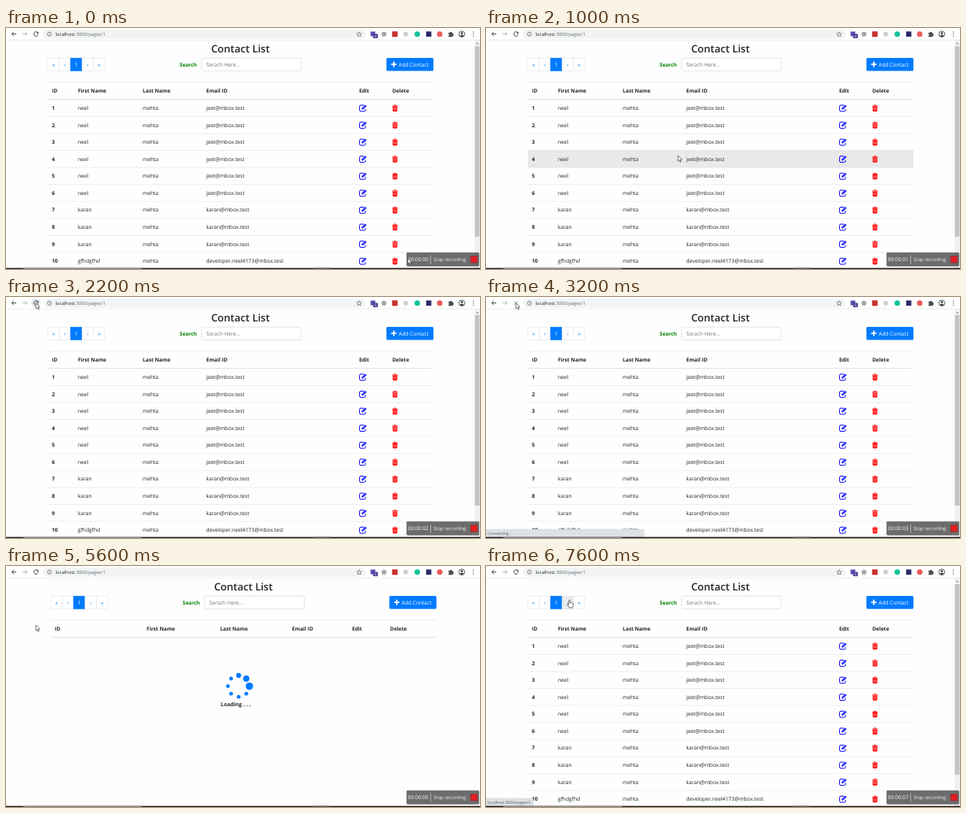
These frames come from a looping animation (600x306 px, 8 s). An HTML page:

```html
<!DOCTYPE html>
<html lang="en">
<head>
<meta charset="utf-8">
<title>Contact List</title>
<style>
  html, body { margin: 0; width: 100%; height: 100%; overflow: hidden; background: #fff; }
  svg { display: block; width: 100vw; height: 100vh; }
  text { font-family: "Open Sans", "Noto Sans", sans-serif; font-size: 6.63px; fill: #212529; text-rendering: geometricPrecision; white-space: pre; }
  .b { font-weight: 700; }
  .mid { text-anchor: middle; }
  .line { fill: none; stroke: #dee2e6; stroke-width: .6; }
  .ico { fill: none; stroke: #4a4d51; stroke-width: 1; }
</style>
</head>
<body>
<svg id="stage" viewBox="0 0 600 306" preserveAspectRatio="none">
  <defs>
    <g id="edit" fill="none" stroke="#00f" stroke-width="1">
      <path d="M6 1H2Q.6 1 .6 2.4V7.4Q.6 8.8 2 8.8H6.6Q8 8.8 8 7.4V5.8"/>
      <path d="M3.3 6.4V4.7L7.6.4L9.4 2.1L5 6.4Z" fill="#00f" stroke="none"/>
      <path d="M4.2 5.3L7.7 1.9" stroke="#fff" stroke-width=".5"/>
    </g>
    <g id="trash">
      <path d="M.7 2.6H6.5V7.6Q6.5 8.8 5.4 8.8H1.8Q.7 8.8 .7 7.6Z" fill="#f00"/>
      <path d="M0 1.9H7.2M2.3 1.7L2.8.6H4.4L4.9 1.7" fill="none" stroke="#f00" stroke-width=".9"/>
      <path d="M2.2 3.7V7.4M3.6 3.7V7.4M5 3.7V7.4" stroke="#fff" stroke-width=".45"/>
    </g>
  </defs>

  <rect width="600" height="306" fill="#fefefe"/>
  <g id="list"></g>
  <g id="load" transform="translate(3.75)"></g>

  <g id="toolbar">
    <rect width="600" height="15" fill="#fff"/>
    <path d="M0 15.2H600" class="line"/>
    <path class="ico" d="M13 7.6H7.4M10 4.9L7.3 7.6L10 10.3"/>
    <path class="ico" d="M21 7.6H26.6M24 4.9L26.7 7.6L24 10.3" style="stroke:#b9bbbe"/>
    <circle id="halo" cx="38" cy="7.8" r="6" fill="#e6e8ea"/>
    <g id="reload">
      <path class="ico" d="M40.2 5.8A2.8 2.8 0 1 0 40.7 8.4"/>
      <path d="M41.1 4.4V7.3H38.2Z" fill="#4a4d51"/>
    </g>
    <path id="stop" class="ico" d="M35.7 5.4L40.3 10M40.3 5.4L35.7 10" style="stroke:#9a9da1"/>
    <rect x="47" y="2" width="408" height="11.6" rx="5.8" fill="#f1f3f4"/>
    <circle class="ico" cx="55" cy="7.8" r="2.6" style="stroke-width:.6"/>
    <path class="ico" d="M55 6.2V6.8M55 7.3V9.3" style="stroke-width:.6"/>
    <text x="62.6" y="9.9" style="font-size:5.85px">localhost<tspan fill="#666b70">:3000/pages/1</tspan></text>
    <path class="ico" style="stroke-width:.6" d="M447 4.8L447.9 6.9L450.1 7.1L448.4 8.5L449 10.7L447 9.5L445 10.7L445.6 8.5L443.9 7.1L446.1 6.9Z"/>
    <rect x="461.5" y="4.5" width="6" height="6" fill="#5b4bb0"/>
    <rect x="464.7" y="7.4" width="6" height="5.6" rx="1" fill="#3d3a8c"/>
    <text class="mid" x="467.7" y="12" style="font-size:4.8px;fill:#fff">6</text>
    <circle cx="478.5" cy="7.8" r="3.1" fill="#a3a6a8"/>
    <rect x="488.7" y="4.3" width="7" height="7" fill="#c9302c"/>
    <circle cx="506" cy="7.8" r="3" fill="#cfcfcf"/>
    <circle cx="520.6" cy="7.7" r="3.5" fill="#15c39a"/>
    <rect x="531.8" y="4.4" width="6.6" height="6.6" fill="#2b2868"/>
    <circle cx="549" cy="7.7" r="3.5" fill="#ee5a5a"/>
    <path fill="#4a4d51" d="M560 6H561.8A1.2 1.2 0 0 1 564.2 6H565.6V7.5A1.2 1.2 0 0 1 565.6 9.9V11.3H560V9.7A1 1 0 0 0 560 7.7Z"/>
    <circle cx="577" cy="7.7" r="3.8" fill="none" stroke="#33363a" stroke-width=".8"/>
    <circle cx="577" cy="6.6" r="1.4" fill="#33363a"/>
    <path d="M574.3 9.9Q577 7.4 579.7 9.9Q577 12.2 574.3 9.9Z" fill="#33363a"/>
    <path d="M591.7 5V5.01M591.7 7.7V7.71M591.7 10.4V10.41" stroke="#4a4d51" stroke-width="1.3" stroke-linecap="round"/>
  </g>

  <g id="status">
    <rect id="bubble" x="-3" y="295" height="13" rx="2" fill="#dee1e6" stroke="#c8cbd0" stroke-width=".4"/>
    <text id="note" x="2" y="302" style="font-size:5.05px;fill:#55585c"></text>
  </g>

  <rect y="304.7" width="600" height="1.3" fill="#161616"/>
  <rect x="22" y="304.7" width="150" height="1.3" fill="#8d8d8d"/>
  <rect x="389" y="304.7" width="21" height="1.3" fill="#555"/>

  <g id="recorder">
    <rect x="507.3" y="285.3" width="91.4" height="17" rx="1" fill="#6c6c6c" stroke="#5a5a5a" stroke-width=".6"/>
    <text id="clock" x="508.8" y="296.4" style="fill:#fff;font-size:6.56px"></text>
    <path d="M537.6 288.5V299.5" stroke="#d5d5d5" stroke-width=".7"/>
    <text x="541" y="296.3" style="fill:#f2f2f2;font-size:6.05px">Stop recording</text>
    <rect x="588.3" y="289.8" width="8.2" height="8.2" fill="#e81c24" stroke="#8f2a2d" stroke-width=".8"/>
  </g>

  <g id="cursor" stroke-linejoin="round">
    <path id="arrow" d="M0 0V7.2L1.7 5.7L2.8 8.2L4 7.7L2.9 5.2H5.1Z" fill="#fff" stroke="#222" stroke-width=".6"/>
    <path id="beam" d="M-1.6 -3.8H-.3L0 -3.5L.3 -3.8H1.6M0 -3.5V3.5M-1.6 3.8H-.3L0 3.5L.3 3.8H1.6" fill="none" stroke="#222" stroke-width=".7"/>
    <path id="hand" d="M-.8 .6Q0 -.6 .8 .6V3.6Q1.6 3 2.2 3.9Q3 3.4 3.5 4.2Q4.6 3.9 4.7 5V7.2Q4.7 8.6 3.8 9.9H-.1L-2.6 6.5Q-2.9 5.2 -1.6 5.6L-.8 6.3Z" fill="#fff" stroke="#222" stroke-width=".65"/>
  </g>
</svg>
<script>
const $ = id => document.getElementById(id);
const show = (id, on) => { $(id).style.display = on ? '' : 'none'; };
const text = (x, y, s, cls = '', style = '') =>
  `<text x="${x}" y="${y}" class="${cls}" style="${style}">${s}</text>`;
const line = (y, w = .6) => `<path class="line" d="M53 ${y}H541" style="stroke-width:${w}"/>`;

const TOP = 90.8, ROW = 21.58;
const listCols = [58, 91, 173, 253.5, 447, 489];
const loadCols = [58, 174.3, 267.3, 358.3, 434.3, 482.3];
const heads = ['ID', 'First Name', 'Last Name', 'Email ID', 'Edit', 'Delete'];

function pager(id) {
  const cells = ['«', '‹', '1', '›', '»'].map((s, i) => {
    const x = 53 + i * 14.4, on = i === 2;
    return `<rect ${i === 3 ? `id="${id}Next"` : ''} x="${x}" y="38.2" width="14.4" height="16.2" rx="${i % 4 ? 0 : 1.5}"
      fill="${on ? '#007bff' : '#fff'}" stroke="${on ? '#007bff' : '#dee2e6'}" stroke-width=".6"/>` +
      text(x + 7.2, 48.7, s, 'mid', `fill:${on ? '#fff' : '#007bff'}`);
  });
  return cells.join('');
}

function header(id, cols) {
  return text(296.7, 31.4, 'Contact List', 'mid', 'font-size:13px;font-weight:600') + pager(id) +
    text(219.8, 48.7, 'Search', 'b', 'fill:#008000;font-size:6.5px') +
    '<rect x="247.6" y="38.2" width="126.2" height="16.2" rx="1.7" fill="#fff" stroke="#ced4da" stroke-width=".6"/>' +
    text(253.6, 48.8, 'Serach Here...', '', 'fill:#6c757d') +
    '<rect x="481.5" y="38" width="59.6" height="16.6" rx="1.7" fill="#007bff"/>' +
    '<path d="M487.5 46.2H494.3M490.9 42.8V49.6" stroke="#fff" stroke-width="1.8"/>' +
    text(497, 48.8, 'Add Contact', '', 'fill:#fff') +
    line(68.7) + line(90.6, 1) +
    heads.map((h, i) => text(cols[i], 82.2, h, 'b', 'font-size:6.56px')).join('');
}

function person(i) {
  if (i < 6) return ['neel', 'mehta', 'jeet@mbox.test'];
  if (i < 9) return ['karan', 'mehta', 'karan@mbox.test'];
  return ['gfhdgfhd', 'mehta', 'developer.neel4173@mbox.test'];
}

function rows() {
  let out = `<rect id="hover" x="53" width="488" height="${ROW}" fill="#e9e9e9"/>`;
  for (let i = 0; i < 10; i++) {
    const y = TOP + i * ROW, base = y + 13.2;
    if (i) out += line(y);
    out += text(listCols[0], base, i + 1, 'b');
    person(i).forEach((s, k) => { out += text(listCols[k + 1], base, s); });
    out += `<use href="#edit" x="447" y="${y + 6.2}"/><use href="#trash" x="488.8" y="${y + 6.4}"/>`;
  }
  return out;
}

$('list').innerHTML = rows() + header('list', listCols) +
  '<rect x="593" y="15" width="7" height="291" fill="#f1f1f1"/>' +
  '<rect x="593.6" y="23" width="5.8" height="242" fill="#c4c4c4"/>' +
  '<path d="M595 20.6L596.6 18.6L598.2 20.6Z" fill="#777"/>';
$('load').innerHTML = header('load', loadCols) +
  text(268.1, 178.2, 'Loading . . .', 'b', 'font-size:6.8px') +
  Array.from({ length: 8 }, (_, i) => {
    const a = i * Math.PI / 4;
    return `<circle class="dot" cx="${290.75 + 13.6 * Math.sin(a)}" cy="${152.6 - 13.6 * Math.cos(a)}" fill="#007bff"/>`;
  }).join('');
const dots = document.querySelectorAll('.dot');

// time, x, y, pointer shape
const path = [
  [0, 508.8, 292.3], [200, 430, 256], [400, 322, 202], [600, 269.5, 167, 'beam'],
  [800, 262, 166, 'beam'], [1000, 243, 162], [1200, 84, 6], [1400, 58, 8],
  [1600, 45, 8.5], [1800, 39.5, 8], [2000, 37.8, 7.6], [4400, 37.8, 26],
  [4600, 37.8, 58], [4800, 37.8, 75], [6800, 48, 71], [7000, 68, 64],
  [7200, 88, 57], [7400, 103, 46, 'hand'], [7600, 105.6, 43, 'hand']
];
// time, hovered row
const hovers = [[0, -1], [200, 7], [400, 5], [600, 3], [1400, -1]];
const notes = [[0, ''], [3200, 'Connecting...', 203], [4400, ''], [7400, 'localhost:3000/pages/2', 63]];
const at = (steps, t) => steps.filter(s => s[0] <= t).pop();

function draw() {
  const t = Math.floor(performance.now() % 8000 / 200) * 200;
  const loading = t >= 3400 && t < 5800;
  show('list', !loading);
  show('load', loading);

  const row = at(hovers, t)[1];
  show('hover', row >= 0);
  $('hover').setAttribute('y', TOP + row * ROW);
  $('listNext').setAttribute('fill', t >= 7400 ? '#e9ecef' : '#fff');

  const busy = t >= 3000 && t < 4400;
  show('stop', busy);
  show('reload', !busy);
  show('halo', t >= 1600 && t < 3000);

  const [, note, width] = at(notes, t);
  show('status', note);
  $('note').textContent = note;
  $('bubble').setAttribute('width', width || 0);
  $('clock').textContent = '00:00:0' + Math.floor((t + 200) / 1000);

  const lead = 6 + (t - 4000) / 1600 * 12;
  dots.forEach((dot, i) => {
    const lag = ((lead - i) % 8 + 8) % 8;
    const grow = lag > 7 ? 2.3 * (lag - 7) : Math.max(0, 2.3 - .78 * lag);
    dot.setAttribute('r', 2.4 + grow);
  });

  const [, x, y, shape = 'arrow'] = at(path, t);
  $('cursor').setAttribute('transform', `translate(${x} ${y})`);
  for (const s of ['arrow', 'beam', 'hand']) show(s, s === shape);
  requestAnimationFrame(draw);
}
draw();
</script>
</body>
</html>
```
